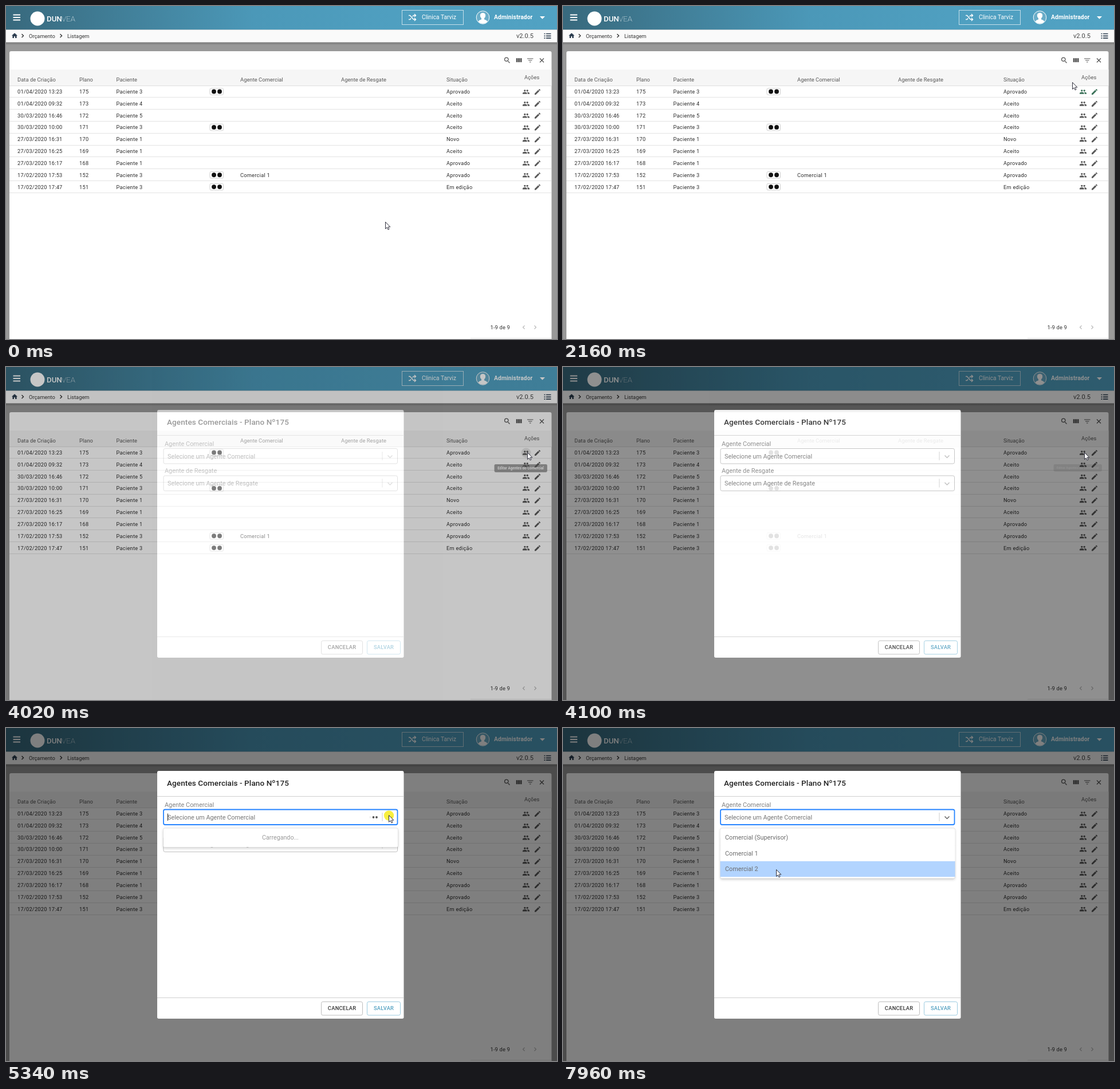
These frames come from a looping animation (962 px wide and 582 px high, 8000 ms). An HTML page:

```html
<!DOCTYPE html>
<html lang="pt-BR">
<head>
<meta charset="utf-8">
<style>
html, body { margin: 0; width: 100%; height: 100%; overflow: hidden; background: #999; }
svg { display: block; width: 962px; height: 582px; font-family: Roboto, Arial, sans-serif; }
text { white-space: pre; }
</style>
</head>
<body>
<svg id="stage" viewBox="0 0 962 582"></svg>
<script>
const LOOP = 8000;
const ROW_TOP = 139.5, ROW_H = 20.82;
const OPTION_TOP = 178, OPTION_H = 27.4;

const text = (x, y, size, fill, str, extra = '') =>
  `<text x="${x}" y="${y}" font-size="${size}" fill="${fill}" ${extra}>${str}</text>`;
const rect = (x, y, w, h, fill, extra = '') =>
  `<rect x="${x}" y="${y}" width="${w}" height="${h}" fill="${fill}" ${extra}/>`;
const line = (d, color, width = 1, extra = '') =>
  `<path d="${d}" fill="none" stroke="${color}" stroke-width="${width}" ${extra}/>`;
const dot = (x, y, r, fill, extra = '') =>
  `<circle cx="${x}" cy="${y}" r="${r}" fill="${fill}" ${extra}/>`;
const group = (id, body, extra = '') => `<g id="${id}" ${extra}>${body}</g>`;

const defs = `<defs>
  <linearGradient id="bar"><stop offset="0" stop-color="#38697d"/><stop offset=".16" stop-color="#3f7a92"/>
    <stop offset=".45" stop-color="#4b98b8"/><stop offset=".7" stop-color="#4f9fc0"/><stop offset="1" stop-color="#51a2c3"/></linearGradient>
  <linearGradient id="fall" x2="0" y2="1"><stop stop-color="#000" stop-opacity=".22"/><stop offset="1" stop-color="#000" stop-opacity="0"/></linearGradient>
  <filter id="soft" x="-10%" y="-30%" width="120%" height="170%"><feDropShadow dx="0" dy="2" stdDeviation="2" flood-opacity=".18"/></filter>
  <g id="people"><circle cx="8" cy="8" r="3"/><circle cx="16" cy="8" r="3"/>
    <path d="M8 13c-2.3 0-7 1.2-7 3.5V19h14v-2.5C15 14.2 10.300 13 8 13zM16 13l-1 .05c1.200.85 2 2 2 3.450V19h6v-2.500C23 14.200 18.300 13 16 13z"/></g>
  <path id="pencil" d="M3 17.250V21h3.750L17.800 9.950 14.050 6.200zM20.700 7.050a1 1 0 0 0 0-1.400l-2.350-2.350a1 1 0 0 0-1.400 0l-1.850 1.800 3.750 3.750z"/>
</defs>`;

function topBar() {
  const dark = '#2d3e50';
  return rect(0, 0, 962, 41.5, 'url(#bar)') +
    line('M12.500 15.500h12.500M12.500 20h12.500M12.500 24.500h12.500', '#fff', 1.9) +
    dot(55, 22, 12.5, '#fff') +
    text(71, 27, 13.3, '#fff', 'DUN', 'font-weight="500"') +
    text(97, 27, 13.6, '#fff', 'VEA', 'font-weight="100"') +
    rect(691.5, 7.5, 107, 25, 'none', 'stroke="#c5dfea"') +
    line('M703 16.500h2.500l6 7h3M703 23.500h2.500l1.700-2M709.700 18.500l1.800-2h3M713 14l2.500 2.500-2.500 2.500M713 21l2.500 2.500-2.500 2.500', '#fff', 1.4) +
    text(726, 23.3, 10.2, '#fff', 'Clinica Tarviz') +
    dot(832.5, 20, 11.3, '#6aadc8', 'stroke="#fff"') +
    `<path d="M824.500 27.500q1-3 5.500-4v-2q-2.500-2-2.200-5.500.5-4 4.700-4t4.700 4q.3 3.500-2.200 5.500v2q4.500 1 5.500 4-3.500 3.200-8 3.200t-8-3.200z" fill="#fff"/>` +
    text(852, 23.3, 10.3, '#fff', 'Administrador', 'font-weight="700" letter-spacing=".1"') +
    '<path d="M932 18h9l-4.500 4.800z" fill="#fff"/>' +
    rect(0, 41.5, 962, 22, '#fafafa') + rect(0, 63.5, 962, 5, 'url(#fall)') +
    `<path d="M10 51.700l5-4.500 5 4.500h-1.400v4.300h-2.600v-3h-2v3h-2.600v-4.300z" fill="${dark}"/>` +
    line('M27.500 49l3 3-3 3M94.500 49l3 3-3 3', '#333', 1.4) +
    text(40, 56, 9.3, '#333', 'Orçamento') + text(107, 56, 9.3, '#333', 'Listagem') +
    text(891, 56, 11.1, '#444', 'v2.0.5') +
    line('M939.500 48.500h2M939.500 52.300h2M939.500 56.100h2M943 48.500h8.500M943 52.300h8.500M943 56.100h8.500', dark, 1.7);
}

function tools() {
  const c = '#555';
  return line('M876.500 96.500l3 3M877 93.300a3.200 3.200 0 1 1-6.400 0a3.200 3.200 0 1 1 6.400 0z', c, 1.3) +
    [890.7, 894.2, 897.7].map(x => rect(x, 91.2, 2.8, 7, c)).join('') +
    line('M910 92h10.500M912 95h6.500M914 98h2.500', c, 1.2) +
    line('M932 91.500l7 7M939 91.500l-7 7', c, 1.3);
}

const rows = [
  ['01/04/2020 13:23', 175, 3, 'Aprovado', 1],
  ['01/04/2020 09:32', 173, 4, 'Aceito'],
  ['30/03/2020 16:46', 172, 5, 'Aceito'],
  ['30/03/2020 10:00', 171, 3, 'Aceito', 1],
  ['27/03/2020 16:31', 170, 1, 'Novo'],
  ['27/03/2020 16:25', 169, 1, 'Aceito'],
  ['27/03/2020 16:17', 168, 1, 'Aprovado'],
  ['17/02/2020 17:53', 152, 3, 'Aprovado', 1, 'Comercial 1'],
  ['17/02/2020 17:47', 151, 3, 'Em edição', 1]
];

function tableRow([date, plan, patient, status, badge, agent], i) {
  const mid = ROW_TOP + ROW_H * i + 10.3;
  const cell = (x, str) => text(x, mid + 3.2, 9.2, '#2b2b2b', str, 'letter-spacing=".28"');
  const bottom = Math.round(ROW_TOP + ROW_H * (i + 1)) - .5;
  return line(`M6 ${bottom}H952`, '#e3e3e3') +
    cell(20, date) + cell(128, plan) + cell(192.5, 'Paciente ' + patient) + cell(769, status) +
    (agent ? cell(409, agent) : '') +
    (badge ? rect(356, mid - 6, 23.5, 11.5, '#fff', 'rx="2" stroke="#ccc" stroke-width=".9"') +
      dot(363, mid - .3, 3.9, '#111') + dot(373, mid - .3, 3.9, '#111') : '') +
    `<g class="actions" fill="#5a5a5a"><use href="#people" transform="translate(901.4 ${mid - 6.4}) scale(.55)"/>
     <use href="#pencil" transform="translate(921.3 ${mid - 6.500}) scale(.56)"/></g>`;
}

function table() {
  const head = (x, str, y = 131.5) => text(x, y, 9.3, '#555', str, 'letter-spacing=".07"');
  return rect(6, 79, 946.5, 510, '#fff', 'rx="3"') + tools() +
    rect(6, 111, 946.5, 28.5, '#f6f6f6') + line('M6 139.500H952', '#e0e0e0') +
    head(20, 'Data de Criação') + head(128, 'Plano') + head(192.5, 'Paciente') +
    head(409, 'Agente Comercial') + head(585, 'Agente de Resgate') + head(769, 'Situação') + head(905, 'Ações', 128) +
    rect(6, 0, 946.5, ROW_H - 1, '#f3f3f3', 'id="hover"') +
    dot(908, 150, 8.5, '#000', 'id="ripple" fill-opacity=".1"') +
    rows.map(tableRow).join('') +
    text(845.5, 565, 9.4, '#333', '1-9 de 9', 'letter-spacing=".13"') +
    line('M905.500 558.500l-3 3 3 3M922.500 558.500l3 3-3 3', '#b5b5b5', 1.1) +
    line('M811 580.500H952', '#e8e8e8');
}

const tooltip = () => group('tooltip', rect(849, 170, 99.500, 15, '#636363', 'rx="2.500"') +
  text(898.7, 180, 6.8, '#fff', 'Editar Agentes do Comercial', 'font-weight="700" text-anchor="middle"'));

const select = (y, label, color, id) =>
  text(277, y - 4.2, 10.9, '#808080', label) +
  rect(275, y + .5, 408.5, 26.5, '#fff', `id="${id}" rx="2.700" stroke="#bfbfbf"`) +
  text(282, y + 17.5, 10.82, '#757575', 'Selecione um ' + label) +
  line(`M657 ${y + 6}v15`, '#ccc') +
  line(`M666.500 ${y + 12.5}l4 4 4-4`, color, 1.5, `id="${id}Arrow"`);

function modal() {
  const button = (x, w, str, color, border) =>
    rect(x, 478.5, w, 23.5, '#fff', `rx="2.700" stroke="${border}"`) +
    text(x + w / 2 + .1, 493.3, 9.3, color, str, 'font-weight="500" letter-spacing=".28" text-anchor="middle"');
  const option = (str, i) => rect(274.5, OPTION_TOP + OPTION_H * i, 410, OPTION_H, '#fff', 'class="option"') +
    text(283, OPTION_TOP + OPTION_H * i + 17.2, 10.8, '#6b6b6b', str);
  const menu = h => rect(274.5, 175, 410, h, '#fff', 'rx="2.700" filter="url(#soft)" stroke="#000" stroke-opacity=".1"');
  return rect(0, 0, 962, 582, '#000', 'fill-opacity=".5"') +
    rect(264, 75, 430.5, 433, '#fff', 'rx="2.700"') +
    text(281, 101.3, 13.5, '#222', 'Agentes Comerciais - Plano Nº175', 'font-weight="500" letter-spacing=".1"') +
    line('M264 119.500h430.500M264 471.500h430.500', '#cfcfcf') +
    select(142, 'Agente Comercial', '#bbb', 'agent') + select(189.5, 'Agente de Resgate', '#bbb', 'rescue') +
    button(550.5, 72, 'CANCELAR', '#333', '#bdbdbd') + button(630.5, 58, 'SALVAR', '#4f9fc0', '#9ccbe0') +
    line('M282.500 149.500v12.500', '#222', 1, 'id="caret"') +
    group('loading', [636, 641.5, 647].map(x => dot(x, 156, 1.9, '#555', 'class="pulse"')).join('') +
      menu(33.5) + text(479, 195.2, 10.7, '#999', 'Carregando...', 'text-anchor="middle"')) +
    group('options', menu(88) + ['Comercial (Supervisor)', 'Comercial 1', 'Comercial 2'].map(option).join(''));
}

const stage = document.getElementById('stage');
stage.innerHTML = defs + rect(0, 0, 962, 582, '#999') + topBar() + table() + tooltip() + group('modal', modal()) +
  dot(0, 0, 8.7, '#f7ec1e', 'id="click" fill-opacity=".85"') +
  group('cursor', '<path d="M.5.500V12.400L3.200 9.900l1.900 4 1.900-.9-1.900-3.900H8.800z" fill="#fff" stroke="#1a1a2a" stroke-width=".9"/>');

const el = id => document.getElementById(id);
const all = sel => [...stage.querySelectorAll(sel)];
const show = (id, on) => el(id).setAttribute('visibility', on ? 'visible' : 'hidden');
const between = (t, a, b) => t >= a && t < b;

// Pointer moves: start, end, number of screen updates, waypoints.
const moves = [
  [360, 430, 2, [[703, 390]]],
  [600, 980, 6, [[770, 320], [865, 215], [893, 172]]],
  [1150, 1930, 11, [[907, 150], [915, 186], [912, 150], [893, 129], [898, 172], [900, 186]]],
  [2000, 2160, 3, [[889, 133]]],
  [2460, 2920, 7, [[906, 153]]],
  [3320, 3320, 1, [[910, 149]]],
  [4560, 5110, 8, [[830, 143], [720, 148], [668, 152]]],
  [5560, 6180, 9, [[640, 158], [549, 165]]],
  [6260, 6340, 2, [[527, 165]]],
  [6570, 6950, 6, [[450, 205], [372, 247]]]
];

function pointer(t) {
  let from = [662, 377];
  for (const [start, end, steps, points] of moves) {
    if (t < start) break;
    const step = (end - start) / (steps - 1 || 1);
    const done = Math.min(1, (Math.floor((t - start) / step + .001) + 1) / steps);
    if (done < 1) {
      const path = [from, ...points], at = done * points.length, i = Math.floor(at);
      return path[i].map((v, k) => v + (path[i + 1][k] - v) * (at - i));
    }
    from = points[points.length - 1];
  }
  return from;
}

function stepped(t, levels) {
  let value = 0;
  for (const [time, v] of levels) if (t >= time) value = v;
  return value;
}

function pulse(ms) {
  if (ms < 0) return 1;
  const p = ms % 1000 / 1000;
  if (p >= .8) return 0;
  return .5 - .5 * Math.cos(Math.PI * 2 * p / .8);
}

function render(t) {
  const [x, y] = pointer(t);
  el('cursor').setAttribute('transform', `translate(${x} ${y})`);

  const row = Math.floor((y - ROW_TOP) / ROW_H);
  show('hover', t < 4020 && row >= 0 && row < rows.length);
  el('hover').setAttribute('y', ROW_TOP + ROW_H * row + .5);
  show('ripple', between(t, 2840, 4100));
  all('.actions')[0].setAttribute('fill', between(t, 1930, 2460) ? '#3b7259' : '#5a5a5a');

  const tip = stepped(t, [[2840, .6], [2920, 1], [4020, .6], [4100, .15], [4170, 0]]);
  const scale = .82 + .18 * tip;
  el('tooltip').setAttribute('opacity', tip);
  el('tooltip').setAttribute('transform', `translate(898.7 170) scale(${scale}) translate(-898.7 -170)`);

  el('modal').setAttribute('opacity', stepped(t, [[4020, .45], [4100, .88], [4170, .97], [4250, 1]]));
  show('modal', t >= 4020);

  const focused = t >= 5190;
  el('agent').setAttribute('stroke', focused ? '#2684ff' : '#bfbfbf');
  el('agent').setAttribute('stroke-width', focused ? 1.8 : 1);
  el('agentArrow').setAttribute('stroke', focused ? '#666' : '#bbb');
  show('caret', t >= 5270 && Math.floor((t - 5270) / 535) % 2 === 0);
  show('loading', between(t, 5270, 5800));
  all('.pulse').forEach((d, i) => d.setAttribute('opacity', pulse(t - 5270 - 160 * i)));

  show('options', t >= 5800);
  const active = Math.max(0, Math.min(2, Math.floor((y - OPTION_TOP) / OPTION_H)));
  const tint = t >= 7810 ? '#b2d4ff' : '#deebff';
  all('.option').forEach((o, i) => o.setAttribute('fill', i === active ? tint : '#fff'));

  show('click', between(t, 3700, 3860) || between(t, 5190, 5410));
  el('click').setAttribute('cx', x + .5);
  el('click').setAttribute('cy', y + 1);
}

const began = performance.now();
function tick() {
  render((performance.now() - began) % LOOP);
  requestAnimationFrame(tick);
}
render(0);
requestAnimationFrame(tick);
</script>
</body>
</html>
```
